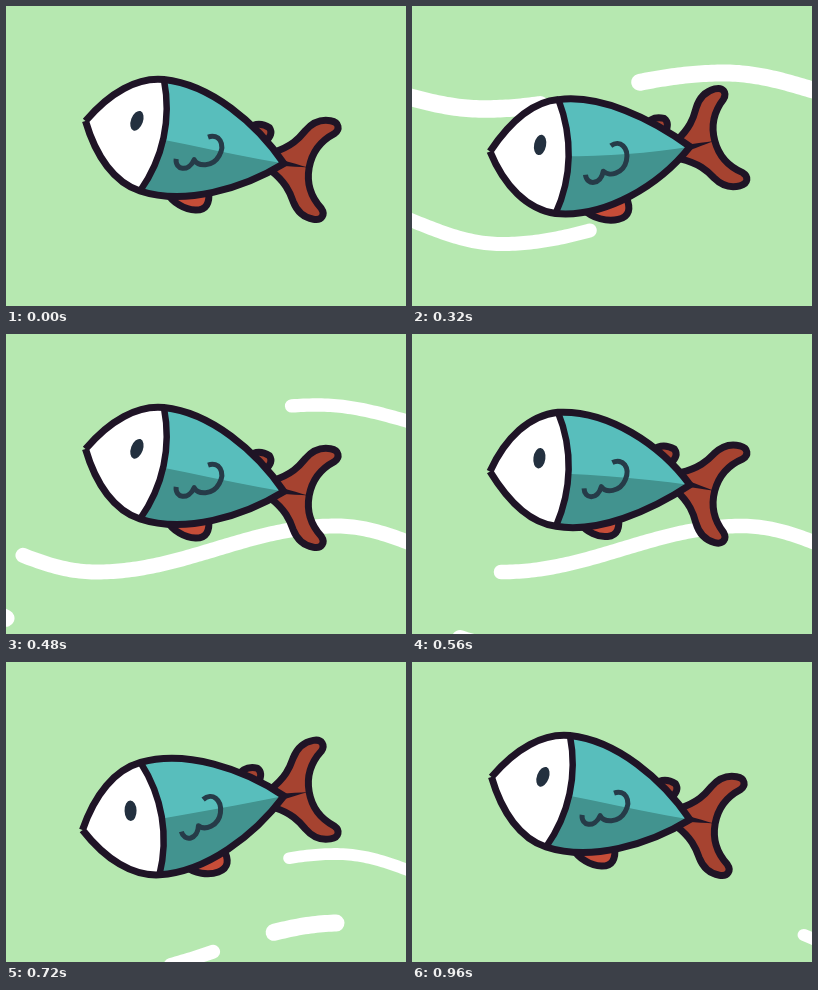
An HTML page with a canvas that plays this animation: 400 by 300 pixels, repeating every 1000 ms.

```html
<!DOCTYPE html>
<html lang="en">
<head>
<meta charset="utf-8">
<title>Swimming fish</title>
<style>
html, body { margin: 0; width: 100%; height: 100%; overflow: hidden; background: #b6e8b0; }
canvas { display: block; width: 400px; height: 300px; }
</style>
</head>
<body>
<canvas id="stage"></canvas>
<script>
const LOOP = 1000, STEP = 40, SWIM = 480, LENGTH = 206;
const GREEN = '#b6e8b0', INK = '#1f1426', RED = '#a64330', CORAL = '#c74d38';
const TEAL = '#58bebc', SHADE = '#42938f', SLATE = '#263b48', EYE = '#23303f';

const canvas = document.getElementById('stage');
const ctx = canvas.getContext('2d');
const ratio = window.devicePixelRatio || 1;
canvas.width = 400 * ratio;
canvas.height = 300 * ratio;
ctx.scale(ratio, ratio);
ctx.lineJoin = 'round';

// Shapes are a start point followed by cubic segments; flip() walks one back below the axis.
const flip = shape => {
  const out = [];
  for (let i = shape.length - 2; i >= 0; i -= 2) out.push(shape[i], -shape[i + 1]);
  return out;
};
const chain = (first, ...rest) => first.concat(...rest.map(s => s.slice(2)));
const mirror = half => chain(half, flip(half));

const FACE = [0,0, 18,-33, 42,-54, 69,-57];
const BACK = [69,-57, 116,-62, 170,-34, LENGTH,0];
const GILL = [69,-57, 85,-20, 85,20, 69,57];
const BODY = mirror(chain(FACE, BACK));
const HEAD = chain(FACE, GILL, flip(FACE));
const BELLY = chain([0,2, 70,2, 140,2, LENGTH,0], flip(BACK), flip(FACE));
const PELVIC = [95,52, 104,62, 118,66, 128,64, 139,62, 141,54, 137,42];
const DORSAL = [163,-27, 169,-34, 176,-35, 184,-32, 188,-28, 187,-24, 183,-17];
const MARK = [98,18, 99,29, 113,29, 116,15, 121,21, 136,19, 140,6, 144,-7, 135,-16, 125,-10];
const TAIL = mirror([-14,-9, 3,-18, 9,-27, 14,-36, 20,-46, 28,-50, 37,-50,
  46,-50, 48,-43, 43,-38, 30,-28, 24,-14, 24,0]);
const SEAM = mirror([-4,-3, 6,-2, 14,-1, 23,0]);

// Each streak rides a wave with its trough at `low`; its tail follows `gap` ms behind its head.
const STREAKS = [
  { mean: 84, amp: 17, low: 72, start: 106, gap: 115, speed: 2.3, accel: 0, width: [11, 14, 19] },
  { mean: 87, amp: 16, low: 72, start: 259, gap: 85, speed: 2.1, accel: 0, width: [18, 17, 12] },
  { mean: 215, amp: 23, low: 90, start: 138, gap: 320, speed: 0.74, accel: 0.0013, width: [11, 20, 9] },
  { mean: 287, amp: 26, low: 95, start: 480, gap: 45, speed: 1.375, accel: 0, width: [17, 17, 17] },
  { mean: 287, amp: 26, low: 95, start: 563, gap: 36, speed: 1.5, accel: -0.00115, width: [15, 14, 12] }
];

const clamp = (v, min, max) => Math.min(max, Math.max(min, v));

// The wave runs steeper outside the stretch from trough to crest.
function waveY({ mean, amp, low }, x) {
  const d = (x - low) / 240, inner = clamp(d, 0, 1);
  return mean + amp * Math.cos(Math.PI * (inner + (d - inner) * 1.35));
}

function drawStreak(streak, t) {
  const { start, gap, speed, accel, width: [a, b, c] } = streak;
  const reach = d => d < 0 ? -20 : speed * d + accel * d * d;
  const head = clamp(reach(t - start), -20, 420), tail = reach(t - start - gap);
  if (head < 0 || tail > 410) return;
  const life = (clamp(head, 0, 400) + clamp(tail, 0, 400)) / 800, rest = 1 - life;
  ctx.beginPath();
  for (let x = tail; x < head; x += 3) ctx.lineTo(x, waveY(streak, x));
  ctx.lineTo(head, waveY(streak, head));
  ctx.lineCap = 'round';
  ctx.strokeStyle = '#fff';
  ctx.lineWidth = a * rest * rest + 2 * b * rest * life + c * life * life;
  ctx.stroke();
}

function paint(shape, map, fill, line, width) {
  const at = i => map(shape[i], shape[i + 1]);
  ctx.beginPath();
  ctx.moveTo(...at(0));
  for (let i = 2; i < shape.length; i += 6) ctx.bezierCurveTo(...at(i), ...at(i + 2), ...at(i + 4));
  if (fill) { ctx.fillStyle = fill; ctx.fill(); }
  if (line) { ctx.strokeStyle = line; ctx.lineWidth = width; ctx.stroke(); }
}

function drawFish(t) {
  const phase = t / SWIM * 2 * Math.PI, c = Math.cos(phase), s = Math.sin(phase);
  const nose = [78 + 1.5 * c - 0.9 * s, 141.5 - 26.5 * c + 10.7 * s];
  const joint = [278, 145.8 + 11.8 * c - 0.9 * s];
  const dx = joint[0] - nose[0], dy = joint[1] - nose[1], bend = -8.7 * s;

  const angleAt = u => Math.atan2(dy + 4 * bend * (1 - 2 * u / LENGTH), dx);
  const spine = (u, v) => {
    const k = u / LENGTH, a = angleAt(u);
    return [nose[0] + k * dx - v * Math.sin(a),
      nose[1] + k * dy + 4 * bend * k * (1 - k) + v * Math.cos(a)];
  };
  const swing = (9.9 * c + 11.1 * s) * Math.PI / 180;
  const tail = (x, y) => [joint[0] + 1.5 + x * Math.cos(swing) - y * Math.sin(swing),
    joint[1] + x * Math.sin(swing) + y * Math.cos(swing)];

  ctx.lineCap = 'butt';
  paint(TAIL, tail, RED, INK, 7);
  paint(SEAM, tail, INK);
  paint(DORSAL, spine, RED, INK, 7);
  paint(PELVIC, spine, CORAL, INK, 7);
  paint(BODY, spine, TEAL);
  paint(BELLY, spine, SHADE);
  paint(HEAD, spine, '#fff');
  paint(MARK, spine, null, SLATE, 5);
  paint(GILL, spine, null, INK, 6.5);
  paint(BODY, spine, null, INK, 7);

  ctx.beginPath();
  ctx.ellipse(...spine(51, -11), 6, 10.3, angleAt(51) + 0.14, 0, 2 * Math.PI);
  ctx.fillStyle = EYE;
  ctx.fill();
}

function draw(now) {
  const t = Math.floor(now % LOOP / STEP) * STEP;
  ctx.fillStyle = GREEN;
  ctx.fillRect(0, 0, 400, 300);
  STREAKS.forEach(streak => drawStreak(streak, t));
  drawFish(t);
}

let start;
function tick(now) {
  if (start === undefined) start = now;
  draw(Math.max(0, now - start));
  requestAnimationFrame(tick);
}
draw(0);
requestAnimationFrame(tick);
</script>
</body>
</html>
```
